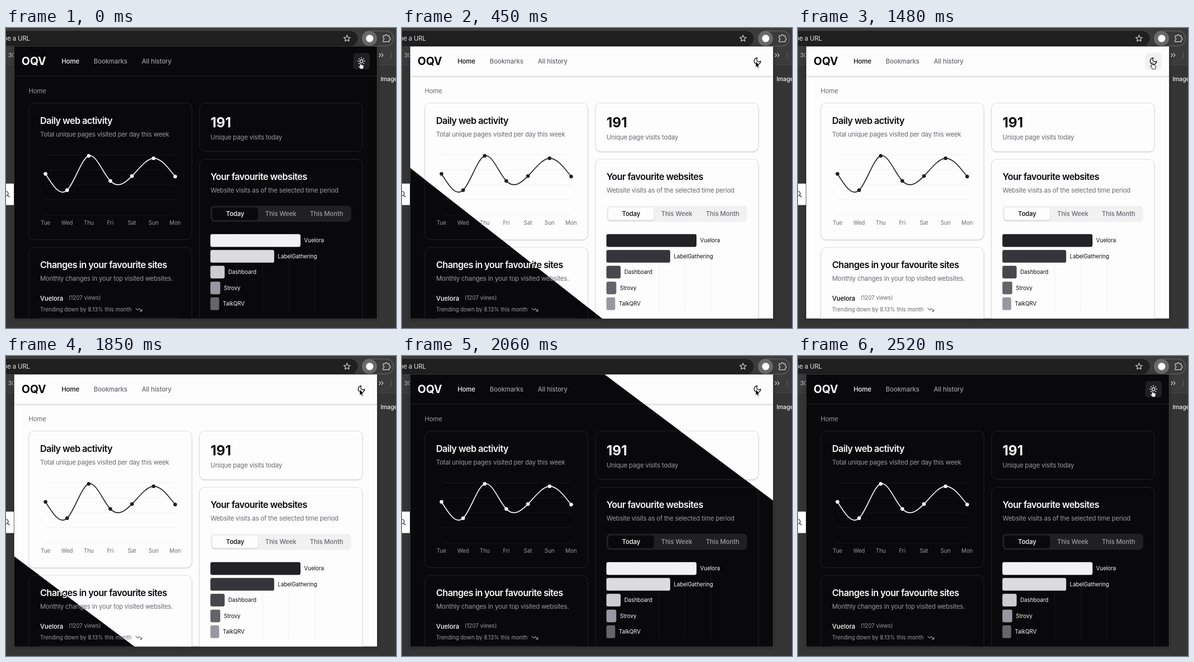
An HTML page that plays this animation: 800 by 616 pixels, repeating every 2.79 s.

```html
<!DOCTYPE html>
<html lang="en">
<head>
<meta charset="utf-8">
<title>Theme toggle</title>
<style>
  html, body { margin: 0; width: 100%; height: 100%; overflow: hidden; background: #363636; }
  svg { display: block; }
  text { font: 400 13.02px Inter, sans-serif; letter-spacing: -.015em; }

  .dark {
    --bg: #09090b; --fg: #fafafa; --muted: #9b9ba1; --border: #242427; --grid: #18181b;
    --tabs: #202023; --hover-bg: #202023; --line: #fafafa; --sun: 1; --moon: 0;
    --header-shadow: none; --card-shadow: none;
    --bar1: #f1f1f3; --bar2: #dcdce0; --bar3: #cbcbd0; --bar4: #9896a1; --bar5: #65656b;
  }
  .light {
    --bg: #fdfdfe; --fg: #09090b; --muted: #69696f; --border: #e0e0e3; --grid: #f0f0f2;
    --tabs: #f1f1f2; --hover-bg: #f1f1f2; --line: #202022; --sun: 0; --moon: var(--moon-in);
    --header-shadow: drop-shadow(0 1px 2px #0004); --card-shadow: drop-shadow(0 1px 1px #0003);
    --bar1: #222224; --bar2: #36353b; --bar3: #48474d; --bar4: #65646a; --bar5: #9997a0;
  }

  .panel, .header, .active { fill: var(--bg); }
  .header { filter: var(--header-shadow); }
  .card { fill: var(--bg); stroke: var(--border); filter: var(--card-shadow); }
  .active { filter: var(--card-shadow); }
  .rule { stroke: var(--border); }
  .grid { stroke: var(--grid); }
  .fg { fill: var(--fg); }
  .muted { fill: var(--muted); }
  .brand { font-size: 22.3px; font-weight: 700; letter-spacing: 0; }
  .nav { font-weight: 500; letter-spacing: -.01em; }
  .title { font-size: 18.6px; font-weight: 600; letter-spacing: -.032em; }
  .count { font-size: 27.9px; font-weight: 700; letter-spacing: 0; }
  .small { font-size: 11.16px; letter-spacing: 0; }
  .middle { text-anchor: middle; }
  .curve { fill: none; stroke: var(--line); stroke-width: 1.86; }
  .dot { fill: var(--line); }
  .hover { fill: var(--hover-bg); opacity: var(--hover); }
  .icon { fill: none; stroke: var(--fg); stroke-width: 2; stroke-linecap: round; stroke-linejoin: round; }
  .sun { opacity: var(--sun); }
  .moon { opacity: var(--moon); }
  .trend { stroke: var(--muted); }
  .chrome { fill: none; stroke: #c9c9c9; stroke-width: 1.4; stroke-linejoin: round; }
</style>
</head>
<body>
<svg id="stage" width="800" height="616" viewBox="0 0 800 616">
  <defs>
    <clipPath id="panelClip"><rect x="17" y="38" width="744" height="558.5"/></clipPath>
    <clipPath id="wipe"><polygon id="wipeShape"/></clipPath>

    <g id="page">
      <rect class="panel" x="17" y="38" width="744" height="559"/>
      <rect class="header" x="17" y="38" width="744" height="60"/>
      <path class="rule" d="M17 98.5H761"/>
      <text class="fg brand" x="32" y="76">OQV</text>
      <text class="fg nav" x="114" y="73">Home</text>
      <text class="muted nav" x="180" y="73">Bookmarks</text>
      <text class="muted nav" x="278.5" y="73">All history</text>

      <rect class="hover" x="712.5" y="51.5" width="33.5" height="33.5" rx="5.6"/>
      <g class="icon" transform="translate(720.1 59.1) scale(.744)">
        <g class="sun"><circle cx="12" cy="12" r="4"/><path id="rays"/></g>
        <path class="moon" d="M12 3a6 6 0 0 0 9 9 9 9 0 1 1-9-9Z"/>
      </g>

      <text class="muted" x="46.5" y="134">Home</text>

      <rect class="card" x="47" y="154" width="334" height="280.5" rx="11"/>
      <text class="fg title" x="70" y="197">Daily web activity</text>
      <text class="muted" x="70" y="222.5">Total unique pages visited per day this week</text>
      <g id="activity"></g>

      <rect class="card" x="47" y="450.5" width="334" height="200" rx="11"/>
      <text class="fg title" x="70" y="493">Changes in your favourite sites</text>
      <text class="muted" x="70" y="519">Monthly changes in your top visited websites.</text>
      <text class="fg nav" x="70" y="560">Vuelora</text>
      <text class="muted small" x="128.5" y="557.5">(1207 views)</text>
      <text class="muted small" x="70" y="582">Trending down by 8.13% this month</text>
      <path class="icon trend" transform="translate(265 571) scale(.62)"
        d="M22 17L13.5 8.5 8.5 13.5 2 7M16 17H22V11"/>
      <path class="rule" d="M70 595H358"/>

      <rect class="card" x="397" y="154" width="334" height="99.5" rx="11"/>
      <text class="fg count" x="419.5" y="204">191</text>
      <text class="muted" x="419.5" y="229">Unique page visits today</text>

      <rect class="card" x="397" y="269.5" width="334" height="380" rx="11"/>
      <text class="fg title" x="419.5" y="312">Your favourite websites</text>
      <text class="muted" x="419.5" y="338">Website visits as of the selected time period</text>
      <rect x="419.5" y="365" width="288.5" height="33" rx="7.5" fill="var(--tabs)"/>
      <rect class="active" x="423" y="368.5" width="94" height="26" rx="5.5"/>
      <text class="fg nav middle" x="470" y="386">Today</text>
      <text class="muted nav middle" x="563.5" y="386">This Week</text>
      <text class="muted nav middle" x="657.5" y="386">This Month</text>
      <g id="sites"></g>
    </g>
  </defs>

  <!-- browser window -->
  <rect width="800" height="616" fill="#353535"/>
  <rect width="800" height="75" fill="#3b3b3b"/>
  <path d="M0 75.5H800" stroke="#454545"/>
  <rect x="-40" y="6" width="761.5" height="31" rx="15.5" fill="#202021"/>
  <text x="49" y="25.5" text-anchor="end" fill="#e2e2e2">Type a URL</text>
  <path class="chrome" d="M699.5 14.8l1.9 4.3 4.7.4-3.6 3.1 1.1 4.6-4.1-2.5-4.1 2.5 1.1-4.6-3.6-3.1 4.7-.4z"/>
  <rect x="730.5" y="6" width="64.5" height="31" rx="15.5" fill="#3b3b3b" stroke="#757575"/>
  <circle cx="746" cy="21.5" r="15" fill="#6a6a6a"/>
  <circle cx="746" cy="21.5" r="7.5" fill="#fff"/>
  <path class="chrome" d="M773.5 16h4.3a2.2 2.2 0 0 1 4.4 0h4v4.3a2.2 2.2 0 0 1 0 4.4v3.5h-12.7v-3.8a2.1 2.1 0 0 0 0-4.2z"/>
  <text x="4.5" y="59.5" fill="#c4c4c4" style="font-size: 12px">30</text>
  <path class="chrome" d="M765 52l3.5 3.7-3.5 3.7M770 52l3.5 3.7-3.5 3.7"/>
  <path d="M790.5 49V62" stroke="#6a6a6a"/>
  <text x="768.5" y="109" fill="#f2f2f2" style="font-size: 12px; font-weight: 500">Images</text>

  <!-- popup -->
  <rect x="16.5" y="38" width="745" height="559" fill="#111" stroke="#4a4a4a"
    style="filter: drop-shadow(0 1px 3px #0006)"/>
  <g clip-path="url(#panelClip)">
    <use href="#page" class="dark"/>
    <g clip-path="url(#wipe)"><use href="#page" class="light"/></g>
  </g>
  <rect y="319.5" width="16" height="44" fill="#fff"/>
  <path d="M0 335.5a4.5 4.5 0 0 1 0 9M3.3 343.3L7.5 347.5" fill="none" stroke="#333" stroke-width="1.6"/>

  <!-- cursors -->
  <path id="arrow" transform="translate(725.3 68.3)" fill="#000" stroke="#fff" stroke-width="1"
    d="M0 0V12.8L2.9 10.2 4.8 14.8 7 13.9 5.1 9.4H9Z"/>
  <path id="hand" fill="#fff" stroke="#000" stroke-width="1" stroke-linejoin="round"
    d="M725.6 79V72.2c0-1.6 2.2-1.6 2.2 0V76c.3-.9 2-.8 2.1.2.5-.8 2-.6 2.1.4.6-.6 1.9-.3 1.9.9V80c0 1.5-.9 2.5-1.2 4.2h-6c-.5-1.6-2.5-3.5-3.7-5-.9-1.2.6-2.2 2.6-.2z"/>
</svg>

<script>
const $ = id => document.getElementById(id);
const PANEL = { left: 17, top: 38, right: 761, width: 744, height: 558 };
const LOOP = 2790, STEP = 30;
const TO_LIGHT = { shown: 180, start: 143, duration: 488 };
const TO_DARK = { shown: 1760, start: 1696, duration: 546 };

function drawRays() {
  const rays = [...Array(8).keys()].map(i => {
    const dx = Math.cos(i * Math.PI / 4), dy = Math.sin(i * Math.PI / 4);
    return `M${12 + dx * 8} ${12 + dy * 8}L${12 + dx * 10} ${12 + dy * 10}`;
  });
  $('rays').setAttribute('d', rays.join(''));
}

// Tangents of a natural cubic spline over evenly spaced points.
function naturalTangents(ys) {
  const m = ys.map(() => 0), last = ys.length - 1;
  for (let pass = 0; pass < 40; pass++) {
    m[0] = (3 * (ys[1] - ys[0]) - m[1]) / 2;
    for (let i = 1; i < last; i++) m[i] = (3 * (ys[i + 1] - ys[i - 1]) - m[i - 1] - m[i + 1]) / 4;
    m[last] = (3 * (ys[last] - ys[last - 1]) - m[last - 1]) / 2;
  }
  return m;
}

function drawActivity() {
  const days = ['Tue', 'Wed', 'Thu', 'Fri', 'Sat', 'Sun', 'Mon'];
  const ys = [299.5, 333, 262.5, 314, 304, 267.5, 305];
  const gap = 266 / 6, x = i => 81 + i * gap, m = naturalTangents(ys);
  let html = '', path = `M${x(0)} ${ys[0]}`;
  for (let i = 0; i < 5; i++) html += `<path class="grid" d="M81 ${260.5 + i * 30.7}H347"/>`;
  for (let i = 1; i < ys.length; i++)
    path += `C${x(i - 1) + gap / 3} ${ys[i - 1] + m[i - 1] / 3} ${x(i) - gap / 3} ${ys[i] - m[i] / 3} ${x(i)} ${ys[i]}`;
  html += `<path class="curve" d="${path}"/>`;
  days.forEach((day, i) => {
    html += `<circle class="dot" cx="${x(i)}" cy="${ys[i]}" r="3.8"/>
      <text class="muted small middle" x="${x(i)}" y="404.3">${day}</text>`;
  });
  $('activity').innerHTML = html;
}

function drawSites() {
  const sites = [['Vuelora', 184.8], ['LabelGathering', 130.8], ['Dashboard', 29.2], ['Strovy', 20.2], ['TalkQRV', 18]];
  let html = '';
  for (let i = 0; i < 5; i++) html += `<path class="grid" d="M${419.5 + i * 53.5} 421V583"/>`;
  sites.forEach(([name, width], i) => {
    const y = 423.3 + i * 32.45;
    html += `<rect x="419.3" y="${y}" width="${width}" height="26.1" rx="3.7" fill="var(--bar${i + 1})"/>
      <text class="fg small" x="${426.8 + width}" y="${y + 17}">${name}</text>`;
  });
  $('sites').innerHTML = html;
}

// cubic-bezier(.42, 0, .58, 1)
function easeInOut(t) {
  if (t <= 0) return 0;
  if (t >= 1) return 1;
  let lo = 0, hi = 1;
  for (let i = 0; i < 24; i++) {
    const s = (lo + hi) / 2;
    if (1.26 * s - .78 * s * s + .52 * s ** 3 < t) lo = s; else hi = s;
  }
  return lo * lo * (3 - 2 * lo);
}

function progress(t, { shown, start, duration }, lead = 0) {
  const stepped = shown + Math.floor((t - shown) / STEP) * STEP;
  return easeInOut((stepped + lead - start) / duration);
}

// How far the light theme reaches along the top and right edges; 2 covers the panel.
function lightReach(t) {
  if (t < 180 || t >= 2240) return [0, 0];
  if (t < 640) return [2 * progress(t, TO_LIGHT), 2 * progress(t, TO_LIGHT, 11)];
  if (t < 1760) return [2, 2];
  const reach = 2 - 2 * progress(t, TO_DARK);
  return [reach, reach];
}

function hoverAmount(t) {
  if (t < 180 || (t >= 1480 && t < 1760)) return 1;
  return t < 2450 ? 0 : Math.min(1, (Math.floor((t - 2450) / STEP) + 1) * .4);
}

function render(t) {
  const [across, down] = lightReach(t), hover = hoverAmount(t);
  const { right, top, width, height } = PANEL;
  $('wipeShape').setAttribute('points',
    `${right},${top} ${right - width * across},${top} ${right},${top + height * down}`);
  $('stage').style.setProperty('--hover', hover);
  $('stage').style.setProperty('--moon-in', Math.min(1, Math.max(0, (t - 310) / 110)));
  $('hand').style.visibility = hover ? 'visible' : 'hidden';
  $('arrow').style.visibility = hover ? 'hidden' : 'visible';
}

drawRays();
drawActivity();
drawSites();
const start = performance.now();
function tick() {
  render((performance.now() - start) % LOOP);
  requestAnimationFrame(tick);
}
tick();
</script>
</body>
</html>
```
